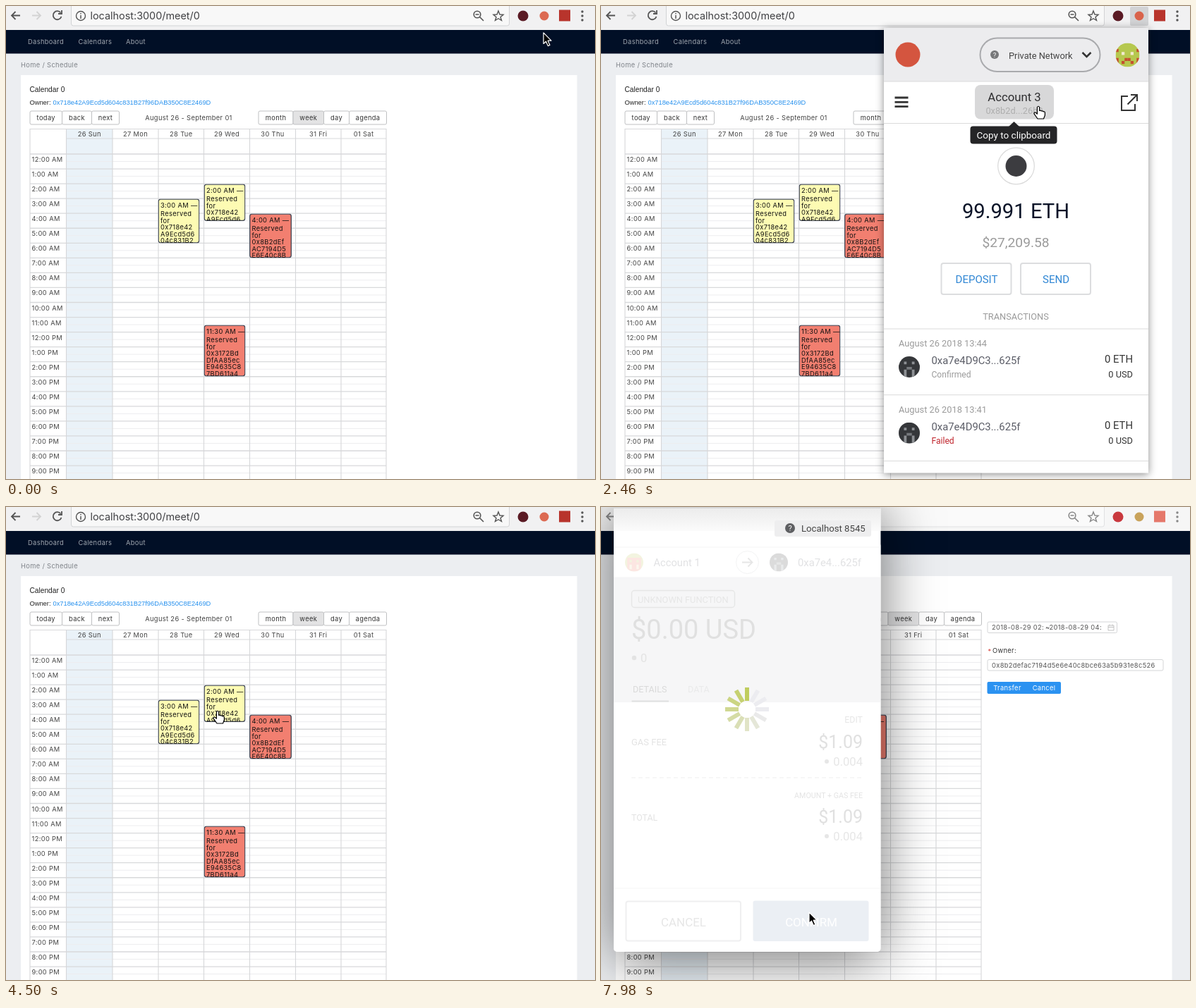
Recreate the animation shown at these times as an HTML page. Size 835x671 px, loop 8 s.

```html
<!DOCTYPE html>
<html lang="en">
<head>
<meta charset="utf-8">
<title>Calendar</title>
<style>
html, body { margin: 0; width: 100%; height: 100%; overflow: hidden; background: #eceef1 }
#stage { display: block; width: 835px; height: 671px }
.ui { font-family: Inter, sans-serif; letter-spacing: .35px }
.rb { font-family: Roboto, sans-serif }
.sans { font-family: "Liberation Sans", Arial, sans-serif; letter-spacing: 0 }
.mid { text-anchor: middle }
.end { text-anchor: end }
.disc { clip-path: circle(50%) }
</style>
</head>
<body>
<svg id="stage" viewBox="0 0 835 671"></svg>
<script>
const LOOP = 8000, STEP = 60;
const OWNER = '0x718e42A9Ecd5d604c831B27f96DAB350C8E2469D';
const NEW_OWNER = '0x8b2defac7194d5e6e40c8bce63a5b931e8c526';
const stage = document.getElementById('stage');

// Markup helpers
const text = (x, y, s, size = 9.3, fill = '#444', cls = '') =>
  `<text x="${x}" y="${y}" font-size="${size}" fill="${fill}" class="${cls}">${s}</text>`;
const box = (x, y, w, h, fill, stroke = 'none', r = 0, sw = 1, more = '') =>
  `<rect x="${x}" y="${y}" width="${w}" height="${h}" rx="${r}" fill="${fill}" stroke="${stroke}" stroke-width="${sw}" ${more}/>`;
const dot = (x, y, r, fill, stroke = 'none', sw = 1) =>
  `<circle cx="${x}" cy="${y}" r="${r}" fill="${fill}" stroke="${stroke}" stroke-width="${sw}"/>`;
const line = (d, stroke, sw = 1, more = '') =>
  `<path d="${d}" fill="none" stroke="${stroke}" stroke-width="${sw}" ${more}/>`;
const group = (id, cls, ...parts) => `<g id="${id}" class="${cls}">${parts.join('')}</g>`;
const range = n => [...Array(n).keys()];

// Mirrored blocks on an 8 x 8 grid, cut to a disc
function avatar(x, y, r, [bg, ...blocks]) {
  const cells = blocks.map(([c, bx, by, w, h]) => box(bx, by, w, h, c) + box(8 - bx - w, by, w, h, c)).join('');
  return `<g transform="translate(${x - r} ${y - r}) scale(${r / 4})" class="disc">${box(0, 0, 8, 8, bg)}${cells}</g>`;
}
const FACES = {
  1: ['#bdc552', ['#f0735c', 1, 2, 3, 6], ['#bdc552', 2, 3, 1, 1], ['#e9d9a0', 2, 5, 1, 2]],
  2: ['#589be8', ['#c9574a', 2, 3, 1, 1], ['#3b70c4', 0, 5, 1, 2], ['#c9574a', 3, 6, 1, 1]],
  3: ['#b6c84f', ['#c5502f', 0, 2, 1, 1], ['#c5502f', 0, 5, 1, 2], ['#f2ead0', 2, 3, 1, 1], ['#c5502f', 3, 5, 1, 1], ['#c5502f', 2, 6, 1, 1]],
  contract: ['#35373a', ['#8d9094', 2, 2, 1, 1], ['#8d9094', 2, 5, 1, 3], ['#75787c', 3, 4, 1, 1]]
};

// Browser bar
const extensions = (shield, wallet, tool) =>
  dot(733, 14, 7.5, shield) + dot(763, 14, 6.5, wallet) + box(784, 5.5, 16, 16, tool);

const browser = group('browser', 'ui',
  box(0, 0, 835, 34, '#f1f1f2'),
  box(92.5, -6, 621, 34, '#f8f8f8', '#d2d3d5', 3),
  line('M20 13.5H8M13.5 8L8 13.5L13.5 19', '#555', 1.8),
  line('M37 13.5H49M43.5 8L49 13.5L43.5 19', '#d3d3d3', 1.8),
  line('M77.5 9.5A6 6 0 1 0 78.5 15M79 6V11H74', '#555', 1.8),
  dot(106, 14, 6.5, 'none', '#555', 1.4), line('M106 13V18M106 10V11.5', '#555', 1.5),
  `<g style="letter-spacing:0">${text(119.5, 19, 'localhost:3000/meet/0', 14.4, '#404144')}</g>`,
  dot(668, 12, 4.8, 'none', '#555', 1.6), line('M671.5 15.5L677 21M665.5 12H670.5', '#555', 1.6),
  line('M698 7L700 12L705 12.3L701 15.7L702.5 20.5L698 17.7L693.5 20.5L695 15.7L691 12.3L696 12Z', '#555', 1.4),
  [8, 14, 20].map(y => dot(817, y, 1.7, '#555')).join(''));

// Calendar page
const columns = [34, 85.5, 151, 216, 280.5, 345.5, 410.5, 475, 539];
const days = ['26 Sun', '27 Mon', '28 Tue', '29 Wed', '30 Thu', '31 Fri', '01 Sat'];
const hourHeight = 21.05, gridTop = 210;
const hours = range(22).map(h => {
  const y = gridTop + h * hourHeight;
  return line(`M34 ${y}H539`, '#d8d9db', 1.3) + line(`M85.5 ${y + 10.5}H539`, '#ededef') +
    text(36.5, y + 11, `${h % 12 || 12}:00 ${h < 12 ? 'AM' : 'PM'}`);
}).join('');

const button = (x, w, label, fill = '#fff') =>
  box(x + .5, 149, w, 19, fill, '#bfc0c2', 2) + text(x + w / 2 + .5, 162, label, 9.3, '#333', 'mid');

function event(x, y, w, h, fill, time, ...address) {
  const lines = [time + ' —', 'Reserved', 'for', ...address];
  return `<svg x="${x}" y="${y}" width="${w}" height="${h}">` +
    box(.7, .7, w - 1.4, h - 1.4, fill, '#3f4655', 3, 1.3) +
    lines.map((s, i) => text(3.5, i ? 14.8 + i * 9.6 : 12.6, s, 9.3, '#111')).join('') + '</svg>';
}
const YELLOW = '#fdfbb3', RED = '#f27f70';

const page = group('page', 'ui',
  box(0, 34, 835, 33.5, '#010f26'),
  text(31, 54, 'Dashboard', 9.3, '#a0a6af'), text(102.5, 54, 'Calendars', 9.3, '#a0a6af'), text(170, 54, 'About', 9.3, '#a0a6af'),
  text(21, 87, 'Home&#160; /&#160; Schedule'.replaceAll('&#160; ', ' '), 9.3, '#7e8288'),
  box(21, 98, 788.5, 573, '#fff'),
  text(33.5, 122, 'Calendar 0', 10.2, '#222', 'sans'),
  text(33.5, 140, 'Owner:', 9.3, '#222', 'sans'), text(66.5, 140, OWNER, 9.3, '#2590ee', 'sans'),
  button(33.5, 45.5, 'today'), button(79, 42, 'back'), button(121, 39, 'next'),
  text(259, 162, 'August 26 - September 01', 9.3, '#444', 'mid'),
  button(357.5, 49, 'month'), button(406.5, 43.5, 'week', '#e3e3e4'), button(450, 36, 'day'), button(486, 53, 'agenda'),
  box(85.5, 174, 65.5, 497, '#eaf2f8'),
  hours,
  line('M34 174.5H539M85.5 188H539', '#d8d9db'),
  columns.map(x => line(`M${x} 174V671`, '#d6d7d9', 1.1)).join(''),
  days.map((d, i) => text((columns[i + 1] + columns[i + 2]) / 2, 185.3, d, 9.3, '#444', 'mid')).join(''),
  event(215.5, 273.5, 59, 63, YELLOW, '3:00 AM', '0x718e42', 'A9Ecd5d6', '04c831B2'),
  event(280.5, 252.5, 59, 52.5, YELLOW, '2:00 AM', '0x718e42', 'A9Ecd5d6'),
  event(345, 294.5, 60, 63, RED, '4:00 AM', '0x8B2dEf', 'AC7194D5', 'E6E40c8B'),
  event(280.5, 452.5, 59, 73, RED, '11:30 AM', '0x3172Bd', 'DfAA85ec', 'E94635C8', '7BD611a4'));

// Transfer form
const form = group('form', 'ui',
  box(548, 163, 183.5, 15.5, '#fff', '#d4d5d7', 2),
  text(554, 174.3, '2018-08-29 02:', 9.3, '#555'), text(630, 174.3, '~'), text(635.5, 174.3, '2018-08-29 04:', 9.3, '#555'),
  line('M719 168H727V175H719ZM719 170.5H727M721 166.5V168.5M725 166.5V168.5', '#bbb', .9),
  text(548.5, 208, '*', 9.3, '#d8453e'), text(555, 207.3, 'Owner:', 9.3, '#333'),
  box(548, 216.5, 249, 15.5, '#fff', '#d4d5d7', 2),
  group('pasted', '', text(554, 227.5, NEW_OWNER, 9.3, '#555')),
  box(547.5, 248, 104.5, 17, '#2b92f1', 'none', 2),
  text(576, 260, 'Transfer', 9.3, '#fff', 'mid'), text(628, 260, 'Cancel', 9.3, '#fff', 'mid'));

// Wallet panel
function account(n, address, eth, usd, rows) {
  const row = ([time, status], i) => {
    const y = 458 + i * 93.7;
    return line(`M401 ${y}H776`, '#dadada') + text(422, y + 25, 'August 26 2018 ' + time, 12.8, '#9b9b9b') +
      (status ? avatar(437, y + 54, 15, FACES.contract) +
        text(468.5, y + 50, '0xa7e4D9C3...625f', 14.8, '#5b5d67') +
        text(468.5, y + 69, status, 12.1, status === 'Failed' ? '#c0242c' : '#9b9b9b') +
        text(754, y + 48, '0 ETH', 14.8, '#333', 'end') + text(754, y + 69, '0 USD', 12.8, '#333', 'end') : '');
  };
  return group('account' + n, '',
    avatar(746.5, 69.5, 17, FACES[n]),
    text(586, 135, 'Account ' + n, 16.7, '#2e2e30', 'mid'), text(586, 153, address, 12.8, '#aeaeae', 'mid'),
    text(588, 301, eth + ' ETH', 29.2, '#0b1428', 'mid'), text(588, 342, '$' + usd, 19.2, '#9b9b9b', 'mid'),
    `<svg width="776" height="662">${rows.map(row).join('')}</svg>`);
}

const outlined = (x, label) => box(x, 365, 99, 44, '#fff', '#dcdddf', 3, 2) + text(x + 50, 393, label, 15, '#2f86d4', 'mid');

const menuAccounts = ['98.062550', '99.985457', '99.991103'].map((balance, i) => {
  const y = 175 + i * 70.5;
  return avatar(496.5, y, 13, FACES[i + 1]) + text(521.5, y + 6.5, 'Account ' + (i + 1), 18.8, '#fff') +
    text(521.5, y + 28, balance + ' ETH', 14.7, '#8f8d8c');
}).join('');

const menu = group('menu', '',
  box(442, 93, 326, 527.5, '#000', 'none', 4, 0, 'fill-opacity=".82"'),
  text(456.5, 127, 'My Accounts', 17, '#f4f4f4'),
  box(655.5, 108, 97, 25, 'none', '#c9c9c9', 4), text(704, 125.3, 'Log out', 13.2, '#f4f4f4', 'mid'),
  line('M442 149H768M442 361H768M442 517H768', '#6a6867'),
  menuAccounts,
  line('M458 0L463 5.5L474 -6', '#fff', 2.4, 'id="check"'),
  line('M456 389H473M464.5 380.5V397.5', '#eee', 1.6),
  line('M464.5 432V444M460 440L464.5 444.5L469 440M456 448H473', '#eee', 1.4),
  line('M464.5 485V500M461 490V493L464.5 496L468 493V490', '#ddd', 1.2),
  dot(464.5, 544.5, 8, '#cfcfcf'), line('M464.5 543V549M464.5 540V541.7', '#333', 1.8),
  dot(464.5, 596.5, 5, 'none', '#cfcfcf', 3.5),
  range(8).map(i => line('M464.5 588.5V591', '#cfcfcf', 3, `transform="rotate(${i * 45} 464.5 596.5)"`)).join(''),
  ['Create Account', 'Import Account', 'Connect Hardware Wallet', 'Info &amp; Help', 'Settings']
    .map((s, i) => text(488, 394.5 + i * 51.8, s, 16.9, '#f4f4f4')).join(''));

const wallet = group('wallet', 'rb',
  box(750, 1, 26, 27, '#d2d3d5', 'none', 2), dot(763, 14, 6.5, '#d9634b'),
  box(401, 31, 375, 631.5, '#fff', 'none', 0, 0, 'style="filter:drop-shadow(0 2px 6px rgba(0,0,0,.45))"'),
  box(401, 31, 375, 76, '#ececee'), line('M401 107H776M401 166.5H776', '#dadada'),
  dot(435, 69, 17.5, '#d4553f'),
  box(537.5, 45.5, 170, 47.5, 'none', '#a9aaad', 24, 2),
  dot(558, 69, 6, '#77787a'), text(558, 72.5, '?', 9.5, '#fff', 'mid'),
  text(578, 74.5, 'Private Network', 12.8, '#444'),
  line('M682.5 66L688.5 72L694.5 66', '#333', 2.5),
  line('M416.5 130H435.5M416.5 136.3H435.5M416.5 142.6H435.5', '#333', 2.8),
  group('hover', '', box(530, 112, 112, 48.5, '#d8d8d9', 'none', 8)),
  line('M747 128H738V148H757V139M751 126H760V135M759.5 126.5L746.5 139.5', '#333', 2),
  dot(588.5, 227, 25.8, '#fff', '#d9d9d9', 1.2), dot(588.5, 227, 15, '#3c3c40'),
  outlined(482.5, 'DEPOSIT'), outlined(595, 'SEND'),
  text(588, 445, 'TRANSACTIONS', 12.8, '#9b9b9b', 'mid'),
  account(1, '0x718e...469d', '98.062', '26,684.78', [['13:50', 'Confirmed'], ['13:42', 'Confirmed'], ['13:40']]),
  account(3, '0x8b2d...26b9', '99.991', '27,209.58', [['13:44', 'Confirmed'], ['13:41', 'Failed'], ['']].slice(0, 2)),
  line('M401 645.4H776', '#dadada'),
  group('tooltip', '', `<path d="M578 171L585.5 164L593 171Z" fill="#252527"/>`,
    box(523.5, 170.5, 123, 25, '#252527', 'none', 4), text(585, 188, 'Copy to clipboard', 13.5, '#fff', 'mid')),
  menu);

// Confirmation window
const amount = y => text(371, y, '$1.09', 25, '#555', 'end') + text(371, y + 25, '0.004', 16.6, '#777', 'end') + dot(320, y + 19, 3, '#777');
const details = group('details', '',
  box(18, 100, 378, 176.5, '#ccced2'),
  line('M18 57H396M18 100H396M18 276.5H396M18 541H396', '#c8cacd'),
  avatar(47, 78.5, 13, FACES[1]), text(74.5, 84, 'Account 1', 14.7, '#5b5d67'),
  dot(207.5, 78.5, 16, '#fff', '#b9bbbe'), line('M200 78.5H214M208.5 72.5L214.5 78.5L208.5 84.5', '#777', 1.8),
  avatar(252, 78.5, 13, FACES.contract), text(279, 84, '0xa7e4...625f', 14.8, '#5b5d67'),
  box(43.5, 118.5, 146, 24, 'none', '#777', 4, 1.4), text(52, 135.5, 'UNKNOWN FUNCTION', 12.8, '#777'),
  text(43, 187, '$0.00 USD', 38, '#555'), dot(47, 214, 3.2, '#666'), text(56, 220, '0', 16.5, '#666'),
  text(45, 263, 'DETAILS', 12.6, '#333'), text(123, 263, 'DATA', 12.6, '#8b8d90'), line('M43.5 275.5H96', '#555', 2),
  text(371, 306, 'EDIT', 12.4, '#777', 'end'),
  text(43, 338, 'GAS FEE', 13, '#666'), amount(342),
  line('M43 384H371', '#aaa', 1, 'stroke-dasharray="6 4"'),
  text(371, 413, 'AMOUNT + GAS FEE', 10.7, '#666', 'end'), text(43, 445, 'TOTAL', 12.4, '#666'), amount(448),
  box(35.5, 559.5, 162.5, 56, '#fff', '#a5a7aa', 3, 2), text(117, 594.5, 'CANCEL', 16.9, '#777', 'mid'),
  box(215.5, 558.5, 164, 57.5, '#2f86d4', 'none', 3, 0, 'id="confirm"'), text(298, 594.5, 'CONFIRM', 16.9, '#fff', 'mid'));

const blade = (i, fill, cls) =>
  `<rect x="12" y="-3" width="19" height="6" fill="${fill}" class="${cls}" transform="rotate(${i * 30})"/>`;
const spinner = `<g id="spinner" transform="translate(207 287)">${
  range(12).map(i => blade(i, '#ececf0', '') + blade(i, '#c0cd5f', 'blade')).join('')}</g>`;

const popup = group('popup', 'rb',
  box(0, 0, 835, 34, '#fff', 'none', 0, 0, 'fill-opacity=".3"'),
  box(722, 3, 82, 22, '#f6f6f7'), extensions('#c9393f', '#c9a35c', '#e5786b'),
  group('badge', '', box(762, 14, 13, 12, '#77787b', 'none', 2), text(768.5, 23.5, '1', 10, '#fff', 'mid')),
  box(18, -8, 378.5, 639, '#fff', 'none', 5, 0, 'style="filter:drop-shadow(0 10px 40px rgba(0,0,0,.55))"'),
  line('M18 1H396.5', '#c9c9c9', 1.5),
  `<linearGradient id="bar" x2="0" y2="1"><stop stop-color="#ececec"/><stop offset="1" stop-color="#fbfbfb"/></linearGradient>`,
  box(18, 2, 378.5, 32, 'url(#bar)'),
  details,
  group('veil', '', box(18, 50, 378.5, 581, '#fff', 'none', 5, 0, 'fill-opacity=".82"')),
  group('network', '', box(246, 19, 137, 23, '#eeeeef', 'none', 3), dot(268, 30, 7, '#5e5f62'),
    text(268, 34, '?', 11, '#fff', 'mid'), text(284, 35, 'Localhost 8545', 13.2, '#444')),
  spinner);

const cursor = `<g id="cursor" stroke-linejoin="round">
  <path id="arrow" d="M0 0V15.5L3.5 12.2L6.3 18.6L9 17.4L6.2 11.2H11Z" fill="#000" stroke="#fff" stroke-width="1.2"/>
  <path id="hand" d="M-1.6 1.5Q0 -1 1.6 1.5V6.5Q3.2 5.6 4.4 7Q6 6.3 7.1 7.8Q9.2 7.3 9.4 9.4V13L7.5 18H-1L-6 10.8Q-6 8 -3.5 9.4L-1.6 11.2Z" fill="#fff" stroke="#000" stroke-width="1.2"/>
</g>`;

stage.innerHTML = browser + extensions('#5a1a24', '#dc6a52', '#b8342c') + page + form + wallet + popup + cursor;

// Timeline
const cursorPath = [
  [0, 762, 38], [60, 762, 38], [420, 764, 12], [900, 764, 12], [1320, 744, 77], [1560, 744, 77],
  [1920, 600, 315], [2100, 600, 315], [2400, 620, 142], [2640, 620, 142], [2940, 745, 76], [3060, 745, 76],
  [3360, 626, 165], [3600, 626, 165], [4020, 345, 325], [4140, 345, 325], [4440, 300, 289], [4860, 300, 289],
  [5160, 660, 223], [5400, 660, 223], [5760, 575, 257], [6480, 575, 257], [6960, 251.5, 428], [7320, 251.5, 428],
  [7740, 295, 575], [8000, 295, 575]
];
const during = (t, ...spans) => spans.some(([a, b]) => t >= a && t < b);
const $ = id => document.getElementById(id);
const show = (id, on) => $(id).style.display = on ? '' : 'none';

function cursorAt(t) {
  const i = cursorPath.findIndex(k => k[0] > t);
  const [t0, x0, y0] = cursorPath[i - 1], [t1, x1, y1] = cursorPath[i];
  const u = (t - t0) / (t1 - t0), e = u * u * (3 - 2 * u);
  return [x0 + (x1 - x0) * e, y0 + (y1 - y0) * e];
}

function draw(t) {
  const third = during(t, [2100, 3600]), hovering = during(t, [2340, 2760]), sent = t >= 7860;
  show('wallet', during(t, [720, 4080]));
  show('account1', !third);
  show('account3', third);
  show('hover', hovering);
  show('tooltip', hovering);
  show('menu', during(t, [1560, 2100], [3060, 3600]));
  $('check').setAttribute('transform', `translate(0 ${third ? 316 : 175})`);
  show('form', t >= 4920);
  show('pasted', t >= 5280);
  show('popup', t >= 5940);
  show('badge', t >= 6120 && !sent);
  show('details', t >= 7320);
  show('network', t >= 7320);
  show('veil', sent);
  $('confirm').setAttribute('fill', sent ? '#90a6c2' : '#2f86d4');

  show('spinner', during(t, [6120, 7320]) || sent);
  const head = sent ? 270 + (t - 7980) * .36 : 30 + (t - 7020) * .36;
  stage.querySelectorAll('.blade').forEach((b, i) => {
    const lag = ((head - i * 30) % 360 + 360) % 360;
    b.setAttribute('opacity', Math.max(0, 1 - lag / 250).toFixed(3));
  });

  const [x, y] = cursorAt(t);
  const pointing = during(t, [1200, 3720], [4320, 4920], [5700, 5940], [7680, 7860]);
  $('cursor').setAttribute('transform', `translate(${x} ${y})`);
  show('hand', pointing);
  show('arrow', !pointing);
}

function tick() {
  const t = performance.now() % LOOP;
  draw(t - t % STEP);
  requestAnimationFrame(tick);
}
tick();
</script>
</body>
</html>
```
